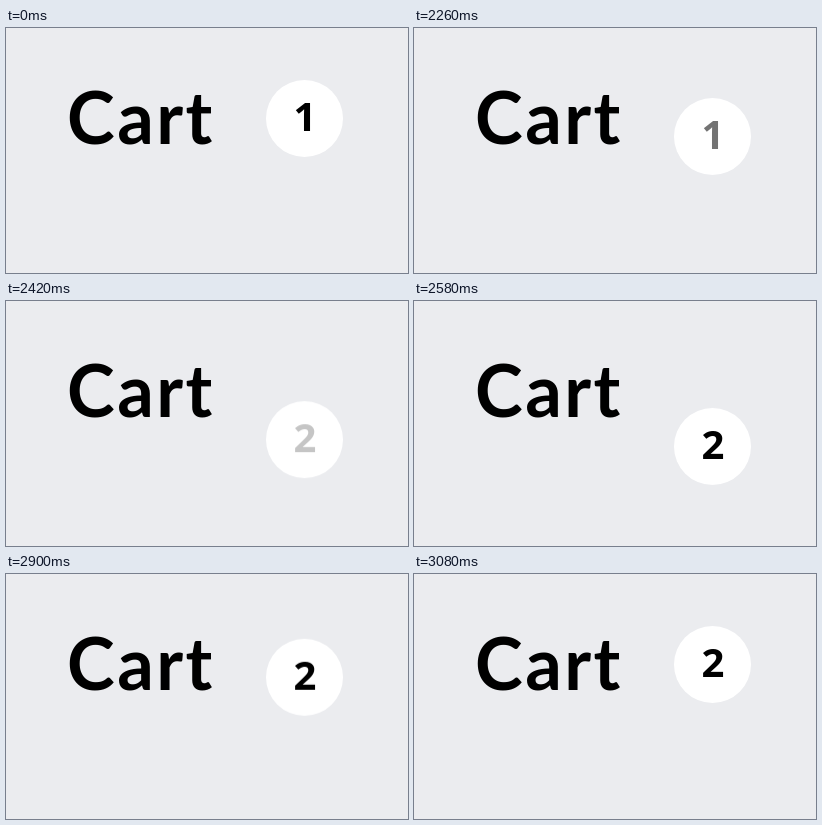
These frames come from a looping animation (402x245 px, 4300 ms). An HTML page:

```html
<!DOCTYPE html>
<html lang="en">
<head>
<meta charset="utf-8">
<title>Cart counter</title>
<style>
  html, body { margin: 0; width: 100%; height: 100%; overflow: hidden; background: #ebecef; }
  svg { display: block; width: 402px; height: 245px; }
  .title { font: 700 72px Lato, sans-serif; letter-spacing: 2.5px; }
  .digit { font: 700 40px "Open Sans", sans-serif; }
</style>
</head>
<body>
<svg viewBox="0 0 402 245">
  <text class="title" x="61" y="115.5">Cart</text>
  <g id="badge">
    <circle cx="298.5" cy="90.5" r="38.5" fill="#fff"/>
    <text class="digit" id="one" x="287.5" y="103">1</text>
    <text class="digit" id="two" x="287.5" y="103">2</text>
  </g>
</svg>
<script>
  const LOOP = 4300;
  const DROP = 55;

  // Each step: [time in ms, value, easing towards the next step]
  function play(id, property, steps) {
    const frames = steps.map(([time, value, easing = 'linear']) =>
      ({ offset: time / LOOP, [property]: value, easing }));
    const animation = document.getElementById(id)
      .animate(frames, { duration: LOOP, iterations: Infinity });
    animation.startTime = document.timeline.currentTime ?? 0;
  }

  const shift = y => `translateY(${y}px)`;

  play('badge', 'transform', [
    [0, shift(0)],
    [2169, shift(0), 'ease'],
    [2599, shift(DROP)],
    [2747, shift(DROP), 'ease'],
    [3077, shift(0)],
    [LOOP, shift(0)]
  ]);
  play('one', 'opacity', [[0, 1], [2169, 1], [2374, 0], [LOOP, 0]]);
  play('two', 'opacity', [[0, 0], [2374, 0], [2580, 1], [LOOP, 1]]);
</script>
</body>
</html>
```
